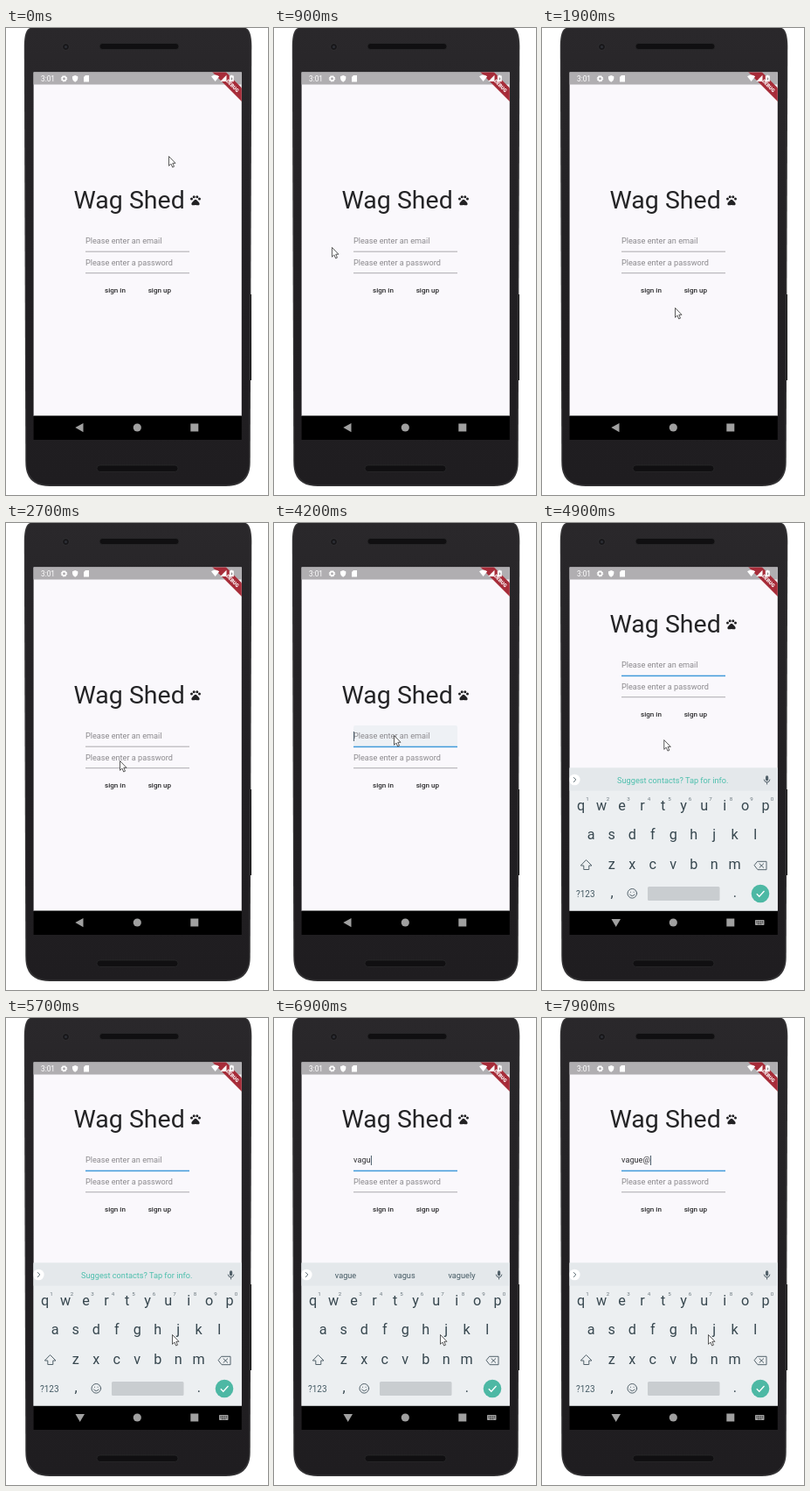
An HTML page that plays this animation: 300 px wide and 533 px high, repeating every 8 s.

```html
<!DOCTYPE html>
<html lang="en">
<head>
<meta charset="utf-8">
<title>Sign-in screen</title>
<style>
  html, body { margin: 0; width: 100%; height: 100%; overflow: hidden; background: #fff; }
  svg { display: block; width: 300px; height: 533px; font-family: Roboto, Arial, sans-serif; }
  .hint { font-size: 9.17px; fill: #8b898d; }
  .button { font-size: 8.1px; font-weight: 500; fill: #29292b; }
  .key { font-size: 16.2px; fill: #37474f; text-anchor: middle; }
  .digit { font-size: 6.2px; fill: #69767d; text-anchor: middle; }
  .word { font-size: 9.2px; fill: #455a64; text-anchor: middle; }
  .line { fill: none; stroke: #52616a; stroke-width: 1; stroke-linejoin: round; stroke-linecap: round; }
</style>
</head>
<body>
<svg viewBox="0 0 300 533">
  <defs>
    <clipPath id="screen"><rect x="31.6" y="50.5" width="238.2" height="419.5"/></clipPath>
    <linearGradient id="shell" x2="0" y2="1">
      <stop stop-color="#2a282b"/><stop offset=".5" stop-color="#222023"/><stop offset="1" stop-color="#1f1d20"/>
    </linearGradient>
  </defs>

  <!-- phone -->
  <rect x="279" y="304" width="2" height="98" fill="#111"/>
  <path d="M27.500 0Q21 2 20.800 20L22.300 496Q22.500 523 50 523H252Q279.500 523 279.700 496L281.300 20Q281 2 274.500 0Z" fill="#343335"/>
  <path d="M29 0Q22.500 3 22.300 21L23.600 495Q24 521.500 51 521.500H251Q278 521.500 278.300 495L279.800 21Q279.500 3 273 0Z" fill="url(#shell)"/>
  <rect x="107" y="17.500" width="91" height="7" rx="3.500" fill="#100f11" stroke="#2c2b2d" stroke-width=".7"/>
  <rect x="104" y="499" width="93" height="7.500" rx="3.700" fill="#100f11" stroke="#2c2b2d" stroke-width=".7"/>
  <circle cx="68.500" cy="21.500" r="4" fill="#18171a" stroke="#363538" stroke-width=".8"/>
  <circle cx="68.500" cy="21.500" r="1.500" fill="#2d3036"/>

  <g clip-path="url(#screen)">
    <rect x="31" y="50" width="240" height="393" fill="#faf8fc"/>
    <rect x="31" y="50" width="240" height="14.500" fill="#b0aeb1"/>

    <!-- form -->
    <g id="form">
      <text x="77.500" y="206" font-size="28.500" fill="#242426">Wag Shed</text>
      <g transform="translate(209.8 189.4) scale(.6)" fill="#222224">
        <circle cx="4.500" cy="9.500" r="2.500"/><circle cx="9" cy="5.500" r="2.500"/>
        <circle cx="15" cy="5.500" r="2.500"/><circle cx="19.500" cy="9.500" r="2.500"/>
        <path d="M12 10.500C14 10.500 15 12 17.300 14.900C19 16.600 20 18 19.600 19.600C19 21.600 17.500 22 12 21.200C6.500 22 5 21.600 4.400 19.600C4 18 5 16.600 6.700 14.900C9 12 10 10.500 12 10.500Z"/>
      </g>
      <rect id="splash" x="91" y="231" width="119" height="24" rx="2" fill="#e9eef1"/>
      <text id="emailHint" class="hint" x="91" y="246.300">Please enter an email</text>
      <text id="typed" x="91" y="246.300" font-size="9.200" fill="#303033"></text>
      <rect id="caret" y="238" width="1" height="11" fill="#4b5c6b"/>
      <rect id="underline" x="91" width="119"/>
      <text class="hint" x="91" y="271">Please enter a password</text>
      <rect x="91" y="279.300" width="119" height=".9" fill="#a3a1a5"/>
      <text class="button" x="113" y="302.300">sign in</text>
      <text class="button" x="162.700" y="302.300">sign up</text>
    </g>

    <!-- corner ribbon -->
    <path d="M236 50H251.500L270 68.500V84Z" fill="#a72c39"/>
    <text transform="translate(258 67.3) rotate(45)" font-size="5.600" font-weight="900" fill="#fff" text-anchor="middle">DEBUG</text>

    <!-- status bar -->
    <g fill="#fff">
      <text x="40" y="60.800" font-size="8.300">3:01</text>
      <circle cx="66.500" cy="57.800" r="2.300" fill="none" stroke="#fff" stroke-width="1.600"/>
      <circle cx="66.500" cy="57.800" r="3.300" fill="none" stroke="#fff" stroke-width="1" stroke-dasharray="1.300 1.300"/>
      <path d="M79.200 54L82.300 55.300V57.800Q82 60.600 79.200 61.700Q76.300 60.600 76 57.800V55.300Z"/>
      <path d="M91 54H95V61.500H89V56Z"/>
      <path d="M235 55.200Q239.600 51.800 244.200 55.200L239.600 61Z"/>
      <path d="M252.500 53.800V61H245.300Z"/>
      <path d="M257.300 53.800H259.300V54.600H260.800V61.300H255.800V54.600H257.300Z"/>
    </g>
    <path d="M258.800 55.800L257.200 58.500H258.200V60.300L259.700 57.600H258.800Z" fill="#8b888b"/>

    <rect x="31" y="442.500" width="240" height="28" fill="#000"/>

    <g id="keyboard">
      <rect x="31" y="279.500" width="240" height="163" fill="#eceff1"/>
      <rect x="31" y="279.500" width="240" height="26" fill="#e4e8eb"/>
      <circle cx="37.300" cy="293" r="6.300" fill="#fff"/>
      <path class="line" d="M36.300 290.500L38.800 293L36.300 295.500"/>
      <text id="suggest" x="149.700" y="296.600" font-size="9.200" fill="#4dbfad" text-anchor="middle">Suggest contacts? Tap for info.</text>
      <g id="words"></g>
      <rect x="256" y="288.300" width="3.200" height="6" rx="1.600" fill="#52616a"/>
      <path class="line" d="M254.300 293Q254.700 296 257.600 296Q260.500 296 260.900 293M257.600 296V298"/>
      <g id="keys"></g>
      <path class="line" d="M50.800 384.800L57 391H53.800V395.500H47.800V391H44.700Z"/>
      <path class="line" d="M247 386.300H257V395.700H247L243.300 391ZM249 388.800L253.700 393.300M253.700 388.800L249 393.300"/>
      <text x="39" y="426.600" font-size="10" fill="#455a64">?123</text>
      <circle class="line" cx="103.300" cy="422.800" r="5.300"/>
      <path class="line" d="M100.500 424Q103.300 427.300 106.100 424M101.500 421.200V421.300M105.100 421.200V421.300"/>
      <rect x="121" y="415" width="82.500" height="16" rx="1.500" fill="#c9cdd0"/>
      <circle cx="250" cy="423" r="10.300" fill="#4db8a4"/>
      <path d="M245.800 423.200L248.800 426.200L254.500 420" fill="none" stroke="#fff" stroke-width="1.300"/>
    </g>

    <!-- navigation icons -->
    <g fill="#a0a0a0">
      <path id="back"/>
      <circle cx="150.300" cy="456" r="4.600"/>
      <rect x="211.300" y="451.500" width="9" height="9"/>
      <g id="switcher">
        <rect x="244" y="453" width="10.500" height="6" rx=".7"/>
        <path d="M245.300 454.700H253.200M245.300 456.200H253.200M247 457.800H251.500" stroke="#000" stroke-width=".7" stroke-dasharray="1 .7"/>
      </g>
    </g>
  </g>

  <path id="pointer" d="M.5.5V11.300L2.900 9L4.700 13L6.500 12.200L4.800 8.300H8Z" fill="#fff" stroke="#333" stroke-width=".8" stroke-linejoin="round"/>
</svg>

<script>
const $ = id => document.getElementById(id);
const LOOP = 8000, TICK = 100;
const TAP = 4000, OPEN = 4300;
const ADDRESS = 'vague@';
const strokes = [6000, 6300, 6500, 6800, 7100, 7600];

// Pointer stops: time, x, y
const path = [
  [100, 186, 146], [1100, 52, 262], [1800, 152, 319], [2000, 152, 319],
  [2400, 126, 288], [2700, 130, 271], [2800, 137, 256], [3200, 137, 242],
  [4800, 137, 242], [5600, 190, 361]
];
const guesses = ['via very view', 'van value vast', 'vague vagus vagrant',
  'vague vagus vaguely', 'vague vaguely vaguer'].map(s => s.split(' '));

const clamp = v => Math.min(1, Math.max(0, v));
const smooth = p => p * p * (3 - 2 * p);
const show = (id, on) => $(id).setAttribute('visibility', on ? 'visible' : 'hidden');

function addText(parent, cls, x, y, text) {
  const node = document.createElementNS('http://www.w3.org/2000/svg', 'text');
  node.setAttribute('class', cls);
  node.setAttribute('x', x);
  node.setAttribute('y', y);
  node.textContent = text;
  $(parent).append(node);
  return node;
}

function addRow(letters, x, y) {
  [...letters].forEach((c, i) => addText('keys', 'key', x + i * 23.5, y, c));
}
addRow('qwertyuiop', 44.6, 327.7);
addRow('asdfghjkl', 56.2, 361);
addRow('zxcvbnm', 79.7, 395.3);
addText('keys', 'key', 80, 427, ',');
addText('keys', 'key', 221, 427, '.');
[...'1234567890'].forEach((c, i) => addText('keys', 'digit', 52 + i * 23.5, 316.8, c));
const slots = [82, 149.5, 215].map(x => addText('words', 'word', x, 296.6, ''));

function pointerAt(t) {
  const i = path.findIndex(stop => stop[0] > t);
  if (i === 0) return path[0].slice(1);
  if (i < 0) return path[path.length - 1].slice(1);
  const [t0, x0, y0] = path[i - 1], [t1, x1, y1] = path[i];
  const p = smooth((t - t0) / (t1 - t0));
  return [x0 + (x1 - x0) * p, y0 + (y1 - y0) * p];
}

function draw(t) {
  const focused = t >= TAP, open = t >= OPEN;
  const count = strokes.filter(s => s <= t).length;
  $('pointer').setAttribute('transform', `translate(${pointerAt(t)})`);

  // form
  $('form').setAttribute('transform', `translate(0 ${open ? -81 : 0})`);
  $('splash').setAttribute('opacity', clamp((t - TAP + 100) / 200) * clamp((4500 - t) / 200) * .65);
  const blue = clamp((t - TAP + 50) / 250);
  $('underline').setAttribute('y', 254.7);
  $('underline').setAttribute('height', .9 + .6 * blue);
  $('underline').setAttribute('fill', `rgb(${163 - 98 * blue},${161 - 7 * blue},${165 + 53 * blue})`);
  show('emailHint', !count);
  $('typed').textContent = ADDRESS.slice(0, count);
  const lastInput = count ? strokes[count - 1] : TAP;
  show('caret', focused && (t - lastInput) % 1000 < 500);
  $('caret').setAttribute('x', 91 + (count ? $('typed').getComputedTextLength() + .3 : 0));

  // keyboard
  const rise = clamp((t - OPEN + 100) / 400);
  show('keyboard', open);
  $('keyboard').setAttribute('opacity', rise ** .7);
  $('keyboard').setAttribute('transform', `translate(0 ${16 * (1 - rise)})`);
  show('switcher', open);
  $('switcher').setAttribute('opacity', rise ** 3);
  $('back').setAttribute('d', open ? 'M79.500 452H90L84.700 461Z' : 'M88.500 451V461.200L79.300 456.100Z');
  $('suggest').style.display = count ? 'none' : '';
  const guess = guesses[count - 1] || ['', '', ''];
  slots.forEach((slot, i) => slot.textContent = guess[i]);
}

const start = performance.now();
function frame() {
  const t = (performance.now() - start) % LOOP;
  draw(Math.floor(t / TICK) * TICK);
  requestAnimationFrame(frame);
}
frame();
</script>
</body>
</html>
```
